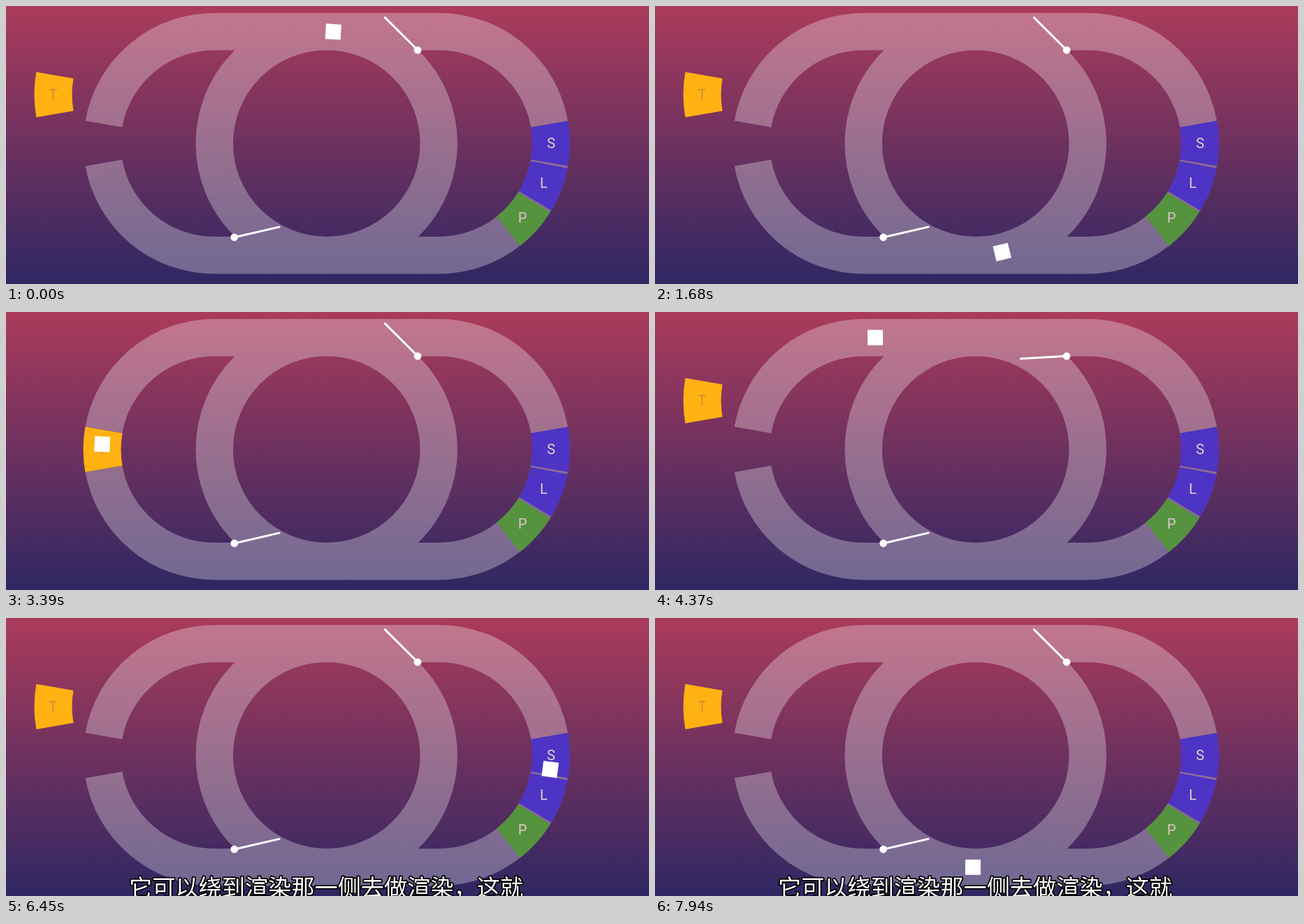
An HTML page with a canvas for the animation above (7990 ms loop, 920 by 399 pixels).

```html
<!DOCTYPE html>
<html lang="zh">
<head>
<meta charset="utf-8">
<style>
  html, body { margin: 0; width: 100%; height: 100%; overflow: hidden; background: #2e2662; }
  canvas { display: block; }
</style>
</head>
<body>
<canvas id="stage" width="920" height="399"></canvas>
<script>
const ctx = document.getElementById('stage').getContext('2d');
const LOOP = 7990;
const R = 160.5, TRACK = 53.5, CY = 197.2;
const LEFT = 298, MID = 458.7, RIGHT = 619.4;
const DEG = Math.PI / 180;

const clamp = v => Math.max(0, Math.min(1, v));
const lerp = (a, b, p) => a + (b - a) * p;
const ease = p => p * p * (3 - 2 * p);
const ramp = (t, start, length) => ease(clamp((t - start) / length));

// Route of the square: half the circle, then the stadium clockwise.
const turn = (cx, from) => ({
  length: Math.PI * R,
  at: d => {
    const a = from + d / R;
    return [cx + R * Math.sin(a), CY - R * Math.cos(a), a];
  }
});
const straight = (x1, x2, side) => ({
  length: Math.abs(x2 - x1),
  at: d => [x1 + Math.sign(x2 - x1) * d, CY + side * R, 0]
});
const route = [
  turn(MID, 0),
  straight(MID, LEFT, 1),
  turn(LEFT, Math.PI),
  straight(LEFT, RIGHT, -1),
  turn(RIGHT, 0),
  straight(RIGHT, LEFT, 1)
];

// [time, distance along the route]
const progress = [
  [0, 9.3], [930, 263.3], [2370, 651.9], [4370, 1186],
  [5820, 1583.5], [6450, 1762.5], [7940, 2159], [7990, 2172.5]
];

function squarePose(t) {
  const i = progress.findIndex(([time]) => time > t);
  const [t0, d0] = progress[i - 1], [t1, d1] = progress[i];
  let d = lerp(d0, d1, (t - t0) / (t1 - t0));
  const leg = route.find(l => d <= l.length || (d -= l.length, false));
  return leg.at(d);
}

function background() {
  const g = ctx.createLinearGradient(0, 0, 0, 399);
  g.addColorStop(0, '#ab3b5b');
  g.addColorStop(1, '#2f2763');
  ctx.fillStyle = g;
  ctx.fillRect(0, 0, 920, 399);
}

function track() {
  ctx.beginPath();
  ctx.arc(LEFT, CY, R, 190 * DEG, 270 * DEG);
  ctx.arc(RIGHT, CY, R, -90 * DEG, 90 * DEG);
  ctx.arc(LEFT, CY, R, 90 * DEG, 170 * DEG);
  ctx.moveTo(MID + R, CY);
  ctx.arc(MID, CY, R, 0, 2 * Math.PI);
  ctx.closePath();
  ctx.lineWidth = TRACK;
  ctx.strokeStyle = 'rgba(255,255,255,.3)';
  ctx.stroke();
}

function segment(label, cx, cy, degrees, color, ink) {
  const a = degrees * DEG;
  ctx.beginPath();
  ctx.arc(cx, cy, R, a - 10 * DEG, a + 10 * DEG);
  ctx.lineWidth = TRACK + .5;
  ctx.strokeStyle = color;
  ctx.stroke();
  ctx.font = '20px Roboto, sans-serif';
  ctx.textAlign = 'center';
  ctx.textBaseline = 'alphabetic';
  ctx.fillStyle = ink;
  ctx.fillText(label, cx + R * Math.cos(a), cy + R * Math.sin(a) + 6.5);
}

function lever(x, y, degrees) {
  ctx.beginPath();
  ctx.moveTo(x, y);
  ctx.lineTo(x + 66 * Math.cos(degrees * DEG), y + 66 * Math.sin(degrees * DEG));
  ctx.lineWidth = 3;
  ctx.lineCap = 'round';
  ctx.strokeStyle = '#fff';
  ctx.stroke();
  ctx.lineCap = 'butt';
  ctx.beginPath();
  ctx.arc(x, y, 5.4, 0, 2 * Math.PI);
  ctx.fillStyle = '#fff';
  ctx.fill();
}

function square(t) {
  const [x, y, angle] = squarePose(t);
  ctx.save();
  ctx.translate(x, y);
  ctx.rotate(angle);
  ctx.fillStyle = '#fff';
  ctx.fillRect(-11, -11, 22, 22);
  ctx.restore();
}

function subtitle() {
  const text = '它可以绕到渲染那一侧去做渲染，这就';
  ctx.font = '500 33.2px "Noto Sans CJK SC", "Noto Sans CJK", sans-serif';
  ctx.textAlign = 'left';
  ctx.textBaseline = 'alphabetic';
  ctx.lineJoin = 'round';
  ctx.lineWidth = 3.5;
  ctx.strokeStyle = '#000';
  ctx.strokeText(text, 176, 399);
  ctx.fillStyle = '#fff';
  ctx.fillText(text, 176, 399);
}

function draw(t) {
  background();
  track();

  const lowered = ramp(t, 2020, 320) - ramp(t, 3850, 300);
  const docked = ramp(t, 2375, 300) - ramp(t, 3530, 300);
  segment('T', LEFT - 70 * (1 - docked), CY - 70 * (1 - lowered), 180, '#ffb212', '#d08b35');
  segment('S', RIGHT, CY, 0, '#4d34c5', '#e9d3c6');
  segment('L', RIGHT, CY, 20.9, '#4d34c5', '#e9d3c6');
  segment('P', RIGHT, CY, 41.8, '#55933e', '#e3c3cc');

  const diverted = ramp(t, 4120, 340) - ramp(t, 5584, 340);
  lever(589, 63.3, lerp(225, 167, diverted));
  lever(326.7, 332, -13);

  square(t);
  if (t >= 5820) subtitle();
}

function tick() {
  draw(performance.now() % LOOP);
  requestAnimationFrame(tick);
}
tick();
</script>
</body>
</html>
```
